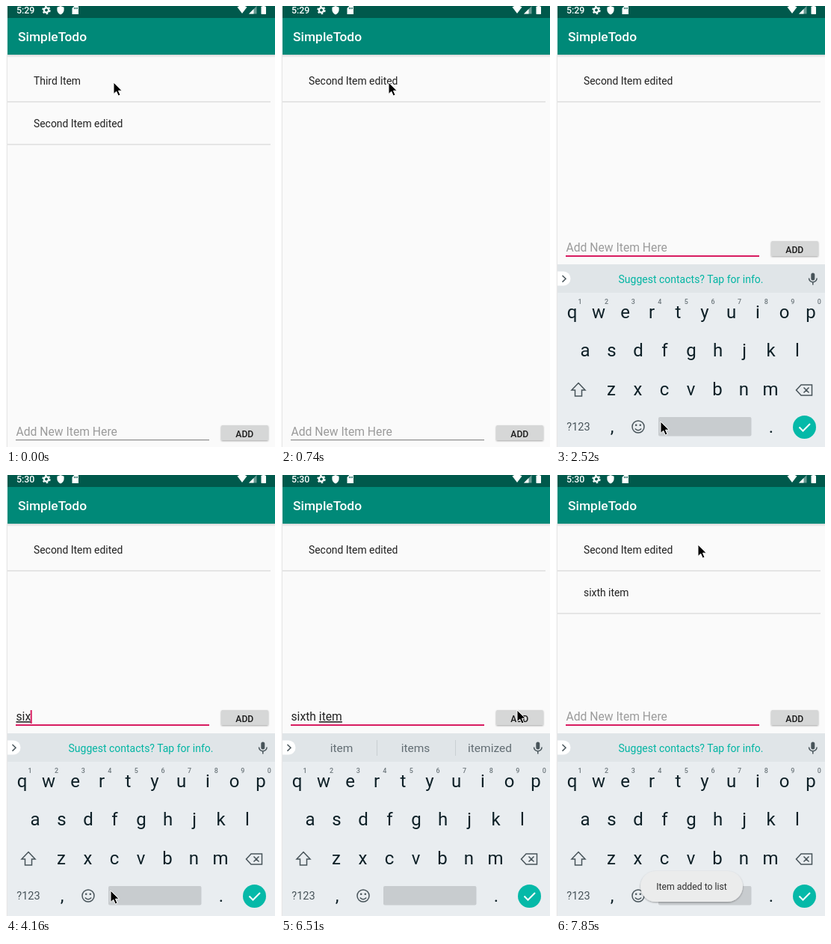
Write an HTML page that moves like this. It is 360 px wide and 589 px high and loops after 8 s.

```html
<!DOCTYPE html>
<html lang="en">
<head>
<meta charset="utf-8">
<title>SimpleTodo</title>
<style>
html, body { margin: 0; width: 100%; height: 100%; overflow: hidden; background: #fafafa; }
svg { display: block; width: 100%; height: 100%; font-family: Roboto, sans-serif; }
text { white-space: pre; }
.item { font-size: 13.9px; fill: #212121; }
.field { font-size: 15.7px; }
.key { font-size: 24px; fill: #0e2027; text-anchor: middle; }
.digit { font-size: 9px; font-weight: 500; fill: #6d777c; text-anchor: middle; }
.word { font-size: 15.5px; fill: #626d73; text-anchor: middle; }
.line { fill: none; stroke: #48545a; stroke-width: 1.5; }
</style>
</head>
<body>
<svg viewBox="0 0 360 589">
  <defs>
    <filter id="soft" x="-20%" y="-50%" width="140%" height="220%">
      <feDropShadow dx="0" dy="1" stdDeviation="1" flood-opacity=".35"/>
    </filter>
    <clipPath id="row"><rect x="2" y="72" width="352" height="56"/></clipPath>
    <linearGradient id="shade" x2="0" y2="1">
      <stop stop-color="#000" stop-opacity=".14"/><stop offset="1" stop-color="#000" stop-opacity="0"/>
    </linearGradient>
  </defs>
  <rect width="360" height="589" fill="#fafafa"/>
  <rect y="65" width="360" height="4" fill="url(#shade)"/>
  <rect width="360" height="65" fill="#008978"/>
  <rect width="360" height="16" fill="#00594c"/>
  <text x="16" y="47" font-size="17.4" font-weight="500" fill="#fff">SimpleTodo</text>

  <g fill="#fff">
    <text id="clock" x="14" y="10" font-size="12.4" font-weight="500"></text>
    <circle cx="54" cy="5.5" r="3.1" fill="none" stroke="#fff" stroke-width="2.4"/>
    <circle cx="54" cy="5.5" r="4.9" fill="none" stroke="#fff" stroke-width="1.6" stroke-dasharray="2.6 2.53"/>
    <path d="M73 0l4.6 1.8v3.4c0 2.8-2 5.2-4.6 6.2-2.6-1-4.600-3.400-4.600-6.200v-3.400z"/>
    <path d="M91.500 0h5.500v11h-8.500v-8z"/>
    <path d="M91.500 2v2.200M93.500 2v2.200M95.400 2v2.200" stroke="#00594c"/>
    <path d="M309.500 1.500Q316 -3 322.500 1.500L316 10z"/>
    <path d="M325 10.500h10.500V0z" opacity=".4"/>
    <path d="M325 10.500h6.500V4z"/>
    <rect x="341.500" y="0.500" width="6.500" height="10.500" rx=".8"/><rect x="343.300" y="-1" width="3" height="2"/>
  </g>

  <circle id="ripple" cx="144" cy="102" fill="#000" opacity=".1" clip-path="url(#row)"/>
  <g id="list"></g>

  <g id="bar">
    <text id="hint" class="field" x="13.500" y="574" fill="#9b9b9b">Add New Item Here</text>
    <text id="input" class="field" x="13.500" y="574" fill="#212121"><tspan id="done"></tspan><tspan id="live" text-decoration="underline"></tspan></text>
    <rect id="caret" y="560" width="2" height="18" fill="#d81b60"/>
    <rect id="under" x="13" width="259"/>
    <rect id="button" x="288" y="560" width="63" height="20" rx="1.500" filter="url(#soft)"/>
    <text x="319.300" y="576" font-size="12.200" font-weight="500" text-anchor="middle" fill="#1c1c1c">ADD</text>
  </g>

  <g id="board">
    <rect x="2" y="345" width="358" height="244" fill="#e9edf0"/>
    <rect x="2" y="345" width="358" height="38" fill="#e0e5e8"/>
    <path d="M2 354.500h8a9.500 9.500 0 0 1 0 19H2z" fill="#fff"/>
    <path class="line" d="M8.500 360l4.500 4.300-4.500 4.300" stroke-width="1.800"/>
    <text id="tip" x="180.500" y="370" font-size="14" text-anchor="middle" fill="#00b5a3">Suggest contacts? Tap for info.</text>
    <g id="words">
      <path d="M128.500 354v21M233.500 354v21" stroke="#c9cfd2"/>
      <text class="word" x="81" y="370"></text>
      <text class="word" x="180" y="370"></text>
      <text class="word" x="279.500" y="370"></text>
    </g>
    <rect x="341.300" y="356.500" width="5" height="10" rx="2.500" fill="#48545a"/>
    <path class="line" d="M338.500 363.500a5.300 5.300 0 0 0 10.600 0M343.800 369v3.500"/>
    <g id="keys"></g>
    <path class="line" d="M30 503.500l9 9.500h-4.500v8h-9v-8H21z"/>
    <path class="line" d="M328 506h14.500v14H328l-6.500-7zM331.500 509.500l7 7M338.500 509.500l-7 7"/>
    <text x="30" y="567" font-size="14.500" text-anchor="middle" fill="#48545a">?123</text>
    <circle class="line" cx="110" cy="562" r="8"/>
    <path class="line" d="M105.800 564.500q4.200 4.500 8.400 0"/>
    <circle cx="107.200" cy="559.800" r="1.300" fill="#48545a"/><circle cx="112.800" cy="559.800" r="1.300" fill="#48545a"/>
    <rect x="137" y="549" width="124.500" height="25.500" rx="2" fill="#c8cccf"/>
    <circle cx="332.500" cy="562.500" r="15.500" fill="#05b9a8"/>
    <path d="M325.500 562.500l5 5 9.500-9.500" fill="none" stroke="#fff" stroke-width="2"/>
  </g>

  <g id="toast">
    <rect x="113" y="529" width="137" height="41" rx="20.500" fill="#ebecec" filter="url(#soft)"/>
    <text x="181.500" y="553.500" font-size="12.250" text-anchor="middle" fill="#303030">Item added to list</text>
  </g>

  <rect width="2" height="589" fill="#fafafa"/>
  <rect x="1" y="65" width="1" height="524" fill="#e6e6e6"/>
  <path id="mouse" d="M0 0V15.500L3.700 12.200L6.300 18L9 16.800L6.500 11.200H11.300Z" fill="#000" stroke="#fff" stroke-linejoin="round"/>
</svg>
<script>
const LOOP = 8000, STEP = 148.15;
const $ = id => document.getElementById(id);
const clamp = v => Math.max(0, Math.min(1, v));
const ease = p => p * p * (3 - 2 * p);
const show = (id, on) => $(id).setAttribute('display', on ? 'inline' : 'none');
const set = (id, attrs) => { for (const k in attrs) $(id).setAttribute(k, attrs[k]); };
const put = (id, s) => { if ($(id).textContent !== s) $(id).textContent = s; };
const latest = (list, t) => list.filter(e => e[0] <= t).pop();

// time, finished text, word being composed
const typing = [
  [0, '', ''], [3860, '', 's'], [4010, '', 'si'], [4160, '', 'six'], [4300, '', 'sixt'], [4450, '', 'sixth'],
  [4890, 'sixth ', ''], [5340, 'sixth ', 'i'], [5490, 'sixth ', 'it'], [5630, 'sixth ', 'ite'],
  [5780, 'sixth ', 'item'], [6960, '', '']
];
const suggestions = [
  [0, ''], [4450, 'sixth sixths sixty'], [4890, 'grade and form'], [5340, 'I it in'], [5490, "it its it's"],
  [5630, 'ite it items'], [5780, 'item items itemized'], [6960, '']
];
const caretTimes = [[0, 0], [1930, 1], [2520, 0], [3110, 1], [3560, 0], [3860, 1], [6370, 0], [6960, 1], [7550, 0]];
const lists = [
  [0, 'Third Item', 'Second Item edited'], [740, 'Second Item edited'], [6960, 'Second Item edited', 'sixth item']
];
// start, end, from, to, bend of the path
const legs = [
  [1040, 1780, 144, 102, 140, 555, 0, 0],
  [5780, 6510, 140, 555, 316, 314, 28, -22],
  [6960, 7550, 316, 314, 206, 120, 0, 0],
  [7550, 7850, 206, 120, 190, 93, 0, 0]
];

const label = (cls, x, y, s) => `<text class="${cls}" x="${x}" y="${y}">${s}</text>`;
const keyRow = (s, x, y) => [...s].map((c, i) => label('key', x + i * 35.5, y, c)).join('');
$('keys').innerHTML = keyRow('qwertyuiop', 21.5, 417) + keyRow('asdfghjkl', 39, 468) + keyRow('zxcvbnm', 74, 520)
  + [...'1234567890'].map((c, i) => label('digit', 32 + i * 35.6, 398, c)).join('')
  + label('key', 75, 570, ',') + label('key', 288, 570, '.');

let shown;
function drawList(items) {
  if (items === shown) return;
  shown = items;
  $('list').innerHTML = items.slice(1).map((s, i) =>
    label('item', 37, 105 + i * 57, s)
    + `<rect x="2" y="${127 + i * 57}" width="352" height="1.8" fill="#e3e3e3"/>`).join('');
}

function moveMouse(t) {
  const [t0, t1, x0, y0, x1, y1, bx, by] = legs.filter(l => l[0] <= t).pop() || legs[0];
  const p = ease(clamp((t - t0) / (t1 - t0))), b = Math.sin(Math.PI * p);
  set('mouse', { transform: `translate(${x0 + (x1 - x0) * p + bx * b} ${y0 + (y1 - y0) * p + by * b})` });
}

function render(t) {
  const q = Math.floor((t + 9) / STEP) * STEP;
  const focus = t >= 1930;
  put('clock', t < 4010 ? '5:29' : '5:30');
  drawList(latest(lists, t));
  show('ripple', t >= 300 && t < 740);
  set('ripple', { r: 240 * clamp((q - 140) / 300) });

  set('bar', { transform: `translate(0 ${t >= 2070 ? -246 : 0})` });
  set('under', focus ? { y: 579, height: 2, fill: '#d81b60' } : { y: 579, height: 1.2, fill: '#8c8c8c' });
  set('button', { fill: t >= 6660 && t < 6960 ? '#bcbdbd' : '#d6d7d7' });

  const [, done, live] = latest(typing, t);
  put('done', done);
  put('live', live);
  show('hint', !done && !live);
  show('caret', latest(caretTimes, t)[1]);
  set('caret', { x: 13 + (done || live ? $('input').getComputedTextLength() : 0) });

  const words = latest(suggestions, t)[1];
  show('tip', !words);
  show('words', words);
  const picks = words.split(' ');
  $('words').querySelectorAll('text').forEach((e, i) => { e.textContent = picks[i] || ''; });

  set('board', { opacity: clamp((q - 2074) / 440) });
  set('toast', { opacity: clamp((q - 6960) / 440) });
  moveMouse(q);
}

const start = performance.now();
function tick() {
  render((performance.now() - start) % LOOP);
  requestAnimationFrame(tick);
}
tick();
</script>
</body>
</html>
```
